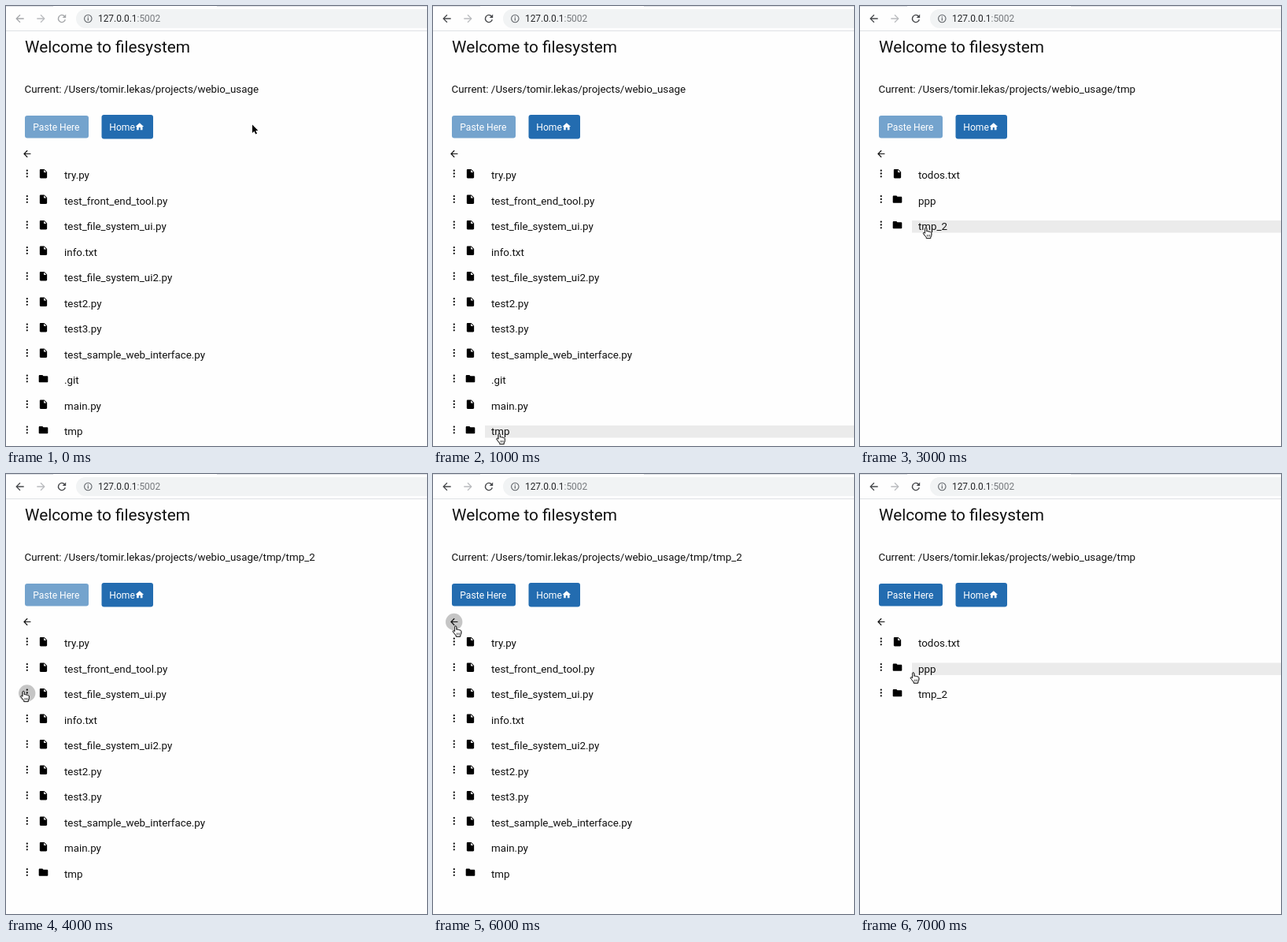
These frames come from a looping animation (535x558 px, 8 s). An HTML page with a canvas:

```html
<!DOCTYPE html>
<html lang="en">
<head>
<meta charset="utf-8">
<title>Filesystem</title>
<style>
  html, body { margin: 0; width: 100%; height: 100%; overflow: hidden; background: #fefefe; }
  canvas { display: block; }
</style>
</head>
<body>
<canvas id="stage" width="535" height="558"></canvas>
<script>
const ctx = document.getElementById('stage').getContext('2d');
const W = 535, H = 558, STEP = 1000, ROW = 32.5, FIRST_ROW = 214.5;
const BLUE = '#236cb0', PALE_BLUE = '#74a3cd';

// Icons on a 24-unit grid
const icons = {
  back: new Path2D('M20 11H7.83l5.59-5.59L12 4l-8 8 8 8 1.41-1.41L7.83 13H20z'),
  home: new Path2D('M10 20v-6h4v6h5v-8h3L12 3 2 12h3v8z'),
  file: new Path2D('M6 2C4.9 2 4 2.9 4 4v16c0 1.1.9 2 2 2h12c1.1 0 2-.9 2-2V8l-6-6zM13 3.5L18.5 9H13z'),
  folder: new Path2D('M10 4H4c-1.1 0-2 .9-2 2v12c0 1.1.9 2 2 2h16c1.1 0 2-.9 2-2V8c0-1.1-.9-2-2-2h-8z')
};
const arrowShape = new Path2D('M0 0V10.4L2.4 8.2 4.2 12.1 6 11.3 4.3 7.5H7.3z');
const handShape = new Path2D('M2.6 1.6C2.6 0 4.8 0 4.8 1.6V5C5.4 4.3 6.7 4.5 6.9 5.3 7.6 4.7 8.7 5 8.9 5.8 9.8 5.3 10.8 5.9 10.8 7V9.5C10.8 10.8 9.8 11.5 9.7 12.3V13.6H4.3V12.4C3.4 11.3 1.6 9.2.5 7.6-.2 6.4 1.3 5.7 2.6 7.3z');
const handLines = new Path2D('M5.3 9v2.6M7 9v2.6M8.7 9v2.6');

const files = ['try.py', 'test_front_end_tool.py', 'test_file_system_ui.py', 'info.txt',
  'test_file_system_ui2.py', 'test2.py', 'test3.py', 'test_sample_web_interface.py'];
const root = '/Users/tomir.lekas/projects/webio_usage';
const folders = {
  project: { path: root, items: [...files, '.git', 'main.py', 'tmp'] },
  tmp: { path: root + '/tmp', items: ['todos.txt', 'ppp', 'tmp_2'] },
  inner: { path: root + '/tmp/tmp_2', items: [...files, 'main.py', 'tmp'] }
};
const isFolder = name => name === '.git' || !name.includes('.');

const scenes = [
  { folder: 'project', arrow: [313, 150.5], inactive: true },
  { folder: 'project', hand: [80.5, 542], hover: 10 },
  { folder: 'tmp', arrow: [109, 364.5] },
  { folder: 'tmp', hand: [80, 281], hover: 2 },
  { folder: 'inner', hand: [18.5, 275], halo: 278 },
  { folder: 'inner', hand: [18.5, 275], halo: 278, paste: true },
  { folder: 'inner', hand: [25, 192.5], halo: 187.5, paste: true },
  { folder: 'tmp', hand: [64, 251.5], hover: 1, paste: true }
];
scenes.push(scenes.shift());
scenes.unshift(scenes.pop());

function text(str, x, y, size, color = '#111') {
  ctx.font = `${size}px Roboto, sans-serif`;
  ctx.fillStyle = color;
  ctx.fillText(str, x, y);
  return x + ctx.measureText(str).width;
}

function disc(x, y, r, color) {
  ctx.fillStyle = color;
  ctx.beginPath();
  ctx.arc(x, y, r, 0, 7);
  ctx.fill();
}

function box(x, y, w, h, r, color) {
  ctx.fillStyle = color;
  ctx.beginPath();
  ctx.roundRect(x, y, w, h, r);
  ctx.fill();
}

function icon(name, x, y, scale, color, flip = 1) {
  ctx.save();
  ctx.translate(x, y);
  ctx.scale(scale * flip, scale);
  ctx.translate(-12, -12);
  ctx.fillStyle = color;
  ctx.fill(icons[name], 'evenodd');
  ctx.restore();
}

function reload(color) {
  ctx.strokeStyle = ctx.fillStyle = color;
  ctx.lineWidth = 1.4;
  ctx.beginPath();
  ctx.arc(71, 16, 4.5, 0.3, 5.5);
  ctx.stroke();
  ctx.beginPath();
  ctx.moveTo(76.2, 10.5);
  ctx.lineTo(76.2, 15);
  ctx.lineTo(71.7, 15);
  ctx.fill();
}

function toolbar(inactive) {
  const color = inactive ? '#a5a7aa' : '#46484b';
  ctx.fillStyle = '#dfe1e5';
  ctx.fillRect(0, 0, 60, 1);
  ctx.fillRect(268, 0, W - 268, 1);
  ctx.fillRect(0, 31, W, 1);
  icon('back', 17.5, 16, 0.65, color);
  icon('back', 44.5, 16, 0.65, '#b9bbbe', -1);
  reload(color);
  box(89, 4, W, 24, 12, '#f1f3f4');
  ctx.strokeStyle = '#5f6368';
  ctx.lineWidth = 1.1;
  ctx.beginPath();
  ctx.arc(104.3, 16, 4.7, 0, 7);
  ctx.stroke();
  ctx.fillStyle = '#5f6368';
  ctx.fillRect(103.7, 15.2, 1.2, 3.4);
  ctx.fillRect(103.7, 13.2, 1.2, 1.2);
  const end = text('127.0.0.1', 117, 20, 11.9, '#252629');
  text(':5002', end, 20, 11.9, '#777a7e');
}

function row(name, i, hovered) {
  const y = FIRST_ROW + i * ROW;
  if (hovered) {
    ctx.fillStyle = '#ebebeb';
    ctx.fillRect(66, y - 7.5, W - 66, 15.5);
  }
  for (const dy of [-3.8, 0, 3.8]) disc(26.8, y - 2 + dy, 1.15, '#111');
  icon(isFolder(name) ? 'folder' : 'file', 47.5, y - 1.8, 0.58, '#000');
  text(name, 74, y + 4.5, 13.36);
}

function cursor(shape, [x, y], fill, stroke, lines) {
  ctx.save();
  ctx.translate(x, y);
  ctx.lineJoin = 'round';
  ctx.lineWidth = 1;
  ctx.strokeStyle = stroke;
  ctx.fillStyle = fill;
  ctx.stroke(shape);
  ctx.fill(shape);
  if (lines) {
    ctx.stroke(shape);
    ctx.lineWidth = 0.7;
    ctx.stroke(lines);
  }
  ctx.restore();
}

function draw(now) {
  const scene = scenes[Math.floor(now / STEP) % scenes.length];
  const { path, items } = folders[scene.folder];
  ctx.fillStyle = '#fefefe';
  ctx.fillRect(0, 0, W, H);
  toolbar(scene.inactive);
  text('Welcome to filesystem', 24, 59, 20.8);
  text('Current: ' + path, 23.5, 110, 13.36);
  box(24, 139, 81, 28.5, 3, scene.paste ? BLUE : PALE_BLUE);
  text('Paste Here', 34.3, 158, 12.1, '#fff');
  box(121.5, 138, 65.5, 30.5, 3, BLUE);
  text('Home', 131.3, 158.3, 12.1, '#fff');
  icon('home', 169.8, 153, 0.53, '#fff');
  if (scene.halo) disc(26.7, scene.halo, 10.7, '#c5c5c5');
  icon('back', 26.8, 187.5, 0.58, '#111');
  items.forEach((name, i) => row(name, i, i === scene.hover));
  if (scene.arrow) cursor(arrowShape, scene.arrow, '#000', '#fff');
  if (scene.hand) cursor(handShape, scene.hand, '#fff', '#222', handLines);
}

const start = performance.now();
function tick() {
  draw(performance.now() - start);
  requestAnimationFrame(tick);
}
tick();
</script>
</body>
</html>
```
